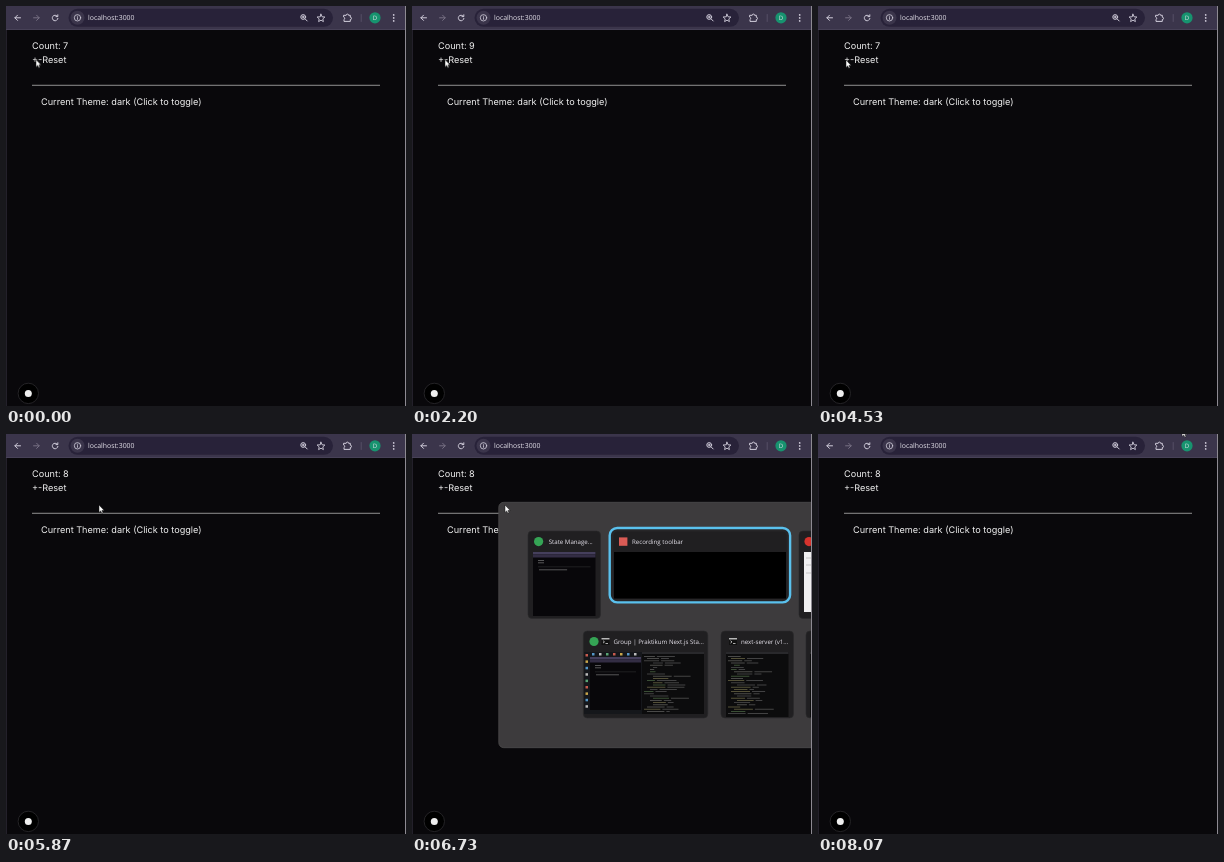
An HTML page for the animation above (8140 ms loop, 400 by 400 pixels).

```html
<!DOCTYPE html>
<html lang="en">
<head>
<meta charset="utf-8">
<title>Counter demo</title>
<style>
  html, body { margin: 0; width: 100%; height: 100%; overflow: hidden; background: #09080b; }
  svg { display: block; width: 400px; height: 400px; text-rendering: geometricPrecision; }
  .page { font: 9.15px Inter, sans-serif; fill: #f0f0f0; }
  .ui { font: 6.9px "Open Sans", sans-serif; fill: #e6e3ec; }
  .titles { font-size: 6.15px; }
  .icon { fill: none; stroke: #d2cedc; stroke-width: 1; stroke-linecap: round; stroke-linejoin: round; }
  .card { fill: #201f21; stroke: #2b2a2c; stroke-width: .6; }

  .seven, .eight, .nine, #switcher { animation: 8140ms step-end infinite; }
  .seven { animation-name: seven; }
  .eight { animation-name: eight; }
  .nine { animation-name: nine; }
  #switcher { animation-name: switcher; }
  #pointer { animation: pointer 8140ms linear infinite; }

  @keyframes seven { 0%, 31.9% { opacity: 1 } .85%, 60.5% { opacity: 0 } }
  @keyframes eight { 0%, 4.05%, 31.9% { opacity: 0 } .85%, 28.6%, 60.5% { opacity: 1 } }
  @keyframes nine { 0%, 28.6% { opacity: 0 } 4.05% { opacity: 1 } }
  @keyframes switcher { 0%, 83.5% { opacity: 0 } 77% { opacity: 1 } }
  @keyframes pointer {
    0%, 5.76% { transform: translate(30px, 53.5px) }
    5.77%, 49.1% { transform: translate(33px, 53.5px) }
    52.4%, 63% { transform: translate(28px, 54px); animation-timing-function: ease-in-out }
    70.4%, 84.4% { transform: translate(93px, 71px); animation-timing-function: ease-in }
    88.1% { transform: translate(404px, 28px); animation-timing-function: step-end }
    88.2%, 96.7% { transform: translate(364px, -10px) }
    99%, 100% { transform: translate(364px, -5px) }
  }
</style>
</head>
<body>
<svg viewBox="0 0 400 400">
  <rect width="400" height="400" fill="#09080b"/>

  <!-- Browser bar -->
  <rect width="400" height="24" fill="#3b354b"/>
  <rect y="23.2" width="400" height=".8" fill="#4a445b"/>
  <rect x="62.5" y="2.8" width="264.5" height="18" rx="9" fill="#282239"/>
  <circle cx="71.5" cy="11.8" r="7" fill="#3b354b"/>
  <g class="icon">
    <path d="M14.5 11.8H9M11.5 9.2L8.9 11.8L11.5 14.4"/>
    <path d="M27.6 11.8H33.1M30.6 9.2L33.2 11.8L30.6 14.4" stroke="#777084"/>
    <path d="M51.3 10.2A2.8 2.8 0 1 0 51.9 12.4M51.8 8.8V10.6H50"/>
    <circle cx="71.5" cy="11.8" r="3.2" stroke-width=".8"/>
    <path d="M71.5 11.6V13.3M71.5 10.2V10.3" stroke-width=".8"/>
    <circle cx="297.2" cy="11" r="2.4"/>
    <path d="M299 12.8L301.2 15M296.2 11H298.2M297.2 10V12"/>
    <path d="M315 8.2L316.1 10.8L318.9 11L316.8 12.9L317.4 15.6L315 14.2L312.6 15.6L313.2 12.9L311.1 11L313.9 10.8Z" stroke-width=".9"/>
    <path d="M338 9.3H340.2A1.2 1.2 0 0 1 342.6 9.3H344.3V11.2A1.2 1.2 0 0 1 344.3 13.6V15.4H338V13.4A1.2 1.2 0 0 0 338 11.2Z"/>
    <path d="M355.2 8.5V15.5" stroke="#5d566e" stroke-width=".8"/>
  </g>
  <circle cx="369" cy="11.8" r="5.6" fill="#17936f"/>
  <text class="ui" x="369" y="14" text-anchor="middle" style="font-size:6px">D</text>
  <g fill="#d2cedc">
    <circle cx="387.7" cy="8.9" r=".85"/><circle cx="387.7" cy="11.9" r=".85"/><circle cx="387.7" cy="14.9" r=".85"/>
  </g>
  <text class="ui" x="82" y="14.4">localhost:3000</text>

  <!-- Page -->
  <g class="page">
    <text class="seven" x="26" y="43.4">Count: 7</text>
    <text class="eight" x="26" y="43.4">Count: 8</text>
    <text class="nine" x="26" y="43.4">Count: 9</text>
    <text x="26" y="57.3">+-Reset</text>
    <text x="35" y="98.8">Current Theme: dark (Click to toggle)</text>
  </g>
  <rect x="26" y="78.8" width="348" height=".9" fill="#a0a0a0"/>
  <circle cx="22.3" cy="387.4" r="10.2" fill="#000" stroke="#29282b" stroke-width=".9"/>
  <circle cx="22.3" cy="387.4" r="3.5" fill="#eee"/>
  <path d="M.4 24V400" stroke="#2f2b38" stroke-width=".8"/>

  <!-- Window switcher -->
  <g id="switcher">
    <rect x="86.8" y="68.3" width="330" height="245.4" rx="5" fill="#3d3b3d" stroke="#4f4d4f" stroke-width=".8"/>
    <rect class="card" x="116" y="97" width="72.5" height="87.5" rx="4"/>
    <rect x="197.7" y="94" width="180.4" height="74.4" rx="7.5" fill="#262527" stroke="#5ac1ee" stroke-width="2.4"/>
    <rect class="card" x="201" y="97" width="174" height="68.5" rx="4.5"/>
    <rect class="card" x="387" y="97" width="72" height="87.5" rx="4"/>
    <rect class="card" x="171.3" y="197" width="124.5" height="87" rx="4"/>
    <rect class="card" x="309" y="197" width="72.5" height="87" rx="4"/>
    <rect class="card" x="394" y="197" width="72" height="87" rx="4"/>

    <circle cx="126.6" cy="107.6" r="4.6" fill="#35a455"/>
    <rect x="207" y="103.4" width="8.4" height="8.4" fill="#d95b55"/>
    <circle cx="397" cy="107.6" r="4.6" fill="#d7332d"/>
    <circle cx="182" cy="207.5" r="4.6" fill="#35a455"/>
    <g id="prompts"></g>
    <g class="ui titles">
      <text x="136.7" y="110">State Manage...</text>
      <text x="220" y="110">Recording toolbar</text>
      <text x="201.5" y="209.8">Group | Praktikum Next.js Sta...</text>
      <text x="329" y="209.8">next-server (v1...</text>
    </g>

    <rect x="202" y="118" width="172" height="46.5" fill="#000"/>
    <rect x="392" y="118" width="10" height="60" fill="#f1f0f1"/>
    <path d="M394 124h6M394 131h6M394 139h6" stroke="#b9b9b9" stroke-width=".8"/>
    <g id="thumbs"></g>
  </g>

  <rect x="399" width="1" height="400" fill="#8d8a92"/>
  <path id="pointer" d="M0 0V7.4L1.7 5.9L2.8 8.3L4 7.8L2.9 5.5H5.2Z" fill="#fff" stroke="#111" stroke-width=".5"/>
</svg>
<script>
  const rect = (x, y, w, h, fill) =>
    `<rect x="${x}" y="${y}" width="${w}" height="${h}" fill="${fill}"/>`;

  let seed = 11;
  const random = () => (seed = (seed * 16807) % 2147483647) / 2147483647;

  const prompt = x => rect(x, 204, 8, 7, '#111') + rect(x, 204, 8, 1.5, '#b8b8b8') +
    `<path d="M${x + 1.5} 206.7l1.5 1.2l-1.5 1.2M${x + 4} 209.5h2.5" fill="none" stroke="#eee" stroke-width=".7"/>`;

  function browser(x, y, w, h) {
    return rect(x, y, w, h, '#08070a') + rect(x, y, w, 2.5, '#453f5c') + rect(x, y + 2.5, w, 3, '#332d44') +
      rect(x + 5, y + 8, 6, .7, '#777') + rect(x + 5, y + 10.5, 6, .7, '#777') +
      rect(x + 5, y + 14.8, w - 10, .3, '#555') + rect(x + 6, y + 17.5, w * .45, .7, '#777');
  }

  function terminal(x, y, w, h) {
    const inks = ['#4c4c4c', '#5b5b58', '#46603f', '#666243'];
    let out = rect(x, y, w, h, '#0c0c0d') + rect(x, y, w, 2, '#29292c');
    for (let row = y + 4; row < y + h - 2; row += 2.2) {
      const indent = 2 + Math.floor(random() * 4) * 3;
      const first = 4 + random() * w * .25;
      const ink = inks[Math.floor(random() * inks.length)];
      out += rect(x + indent, row, first, .8, ink);
      if (random() < .55) out += rect(x + indent + first + 2, row, 3 + random() * w * .28, .8, '#505050');
    }
    return out;
  }

  function desktop(x, y, w, h) {
    const inks = ['#c75b4e', '#c9a64b', '#5597c9', '#bbb', '#59a575'];
    let out = rect(x, y, w, h, '#15171b');
    for (let i = 0; i < 9; i++) {
      out += rect(x + 1.5, y + 2 + i * 6.4, 2.5, 2.5, inks[i % 5]);
      if (i < 7) out += rect(x + 8 + i * 7, y + 1, 2.5, 2.5, inks[(i + 2) % 5]);
    }
    return out + browser(x + 6, y + 5, w - 7, h - 9);
  }

  document.getElementById('prompts').innerHTML = prompt(189.5) + prompt(317);
  document.getElementById('thumbs').innerHTML =
    browser(121, 118, 62.5, 64) + desktop(172, 218, 58, 62) +
    terminal(230, 218, 62, 62) + terminal(314, 218, 62.5, 65) + terminal(398, 218, 60, 65);
</script>
</body>
</html>
```
